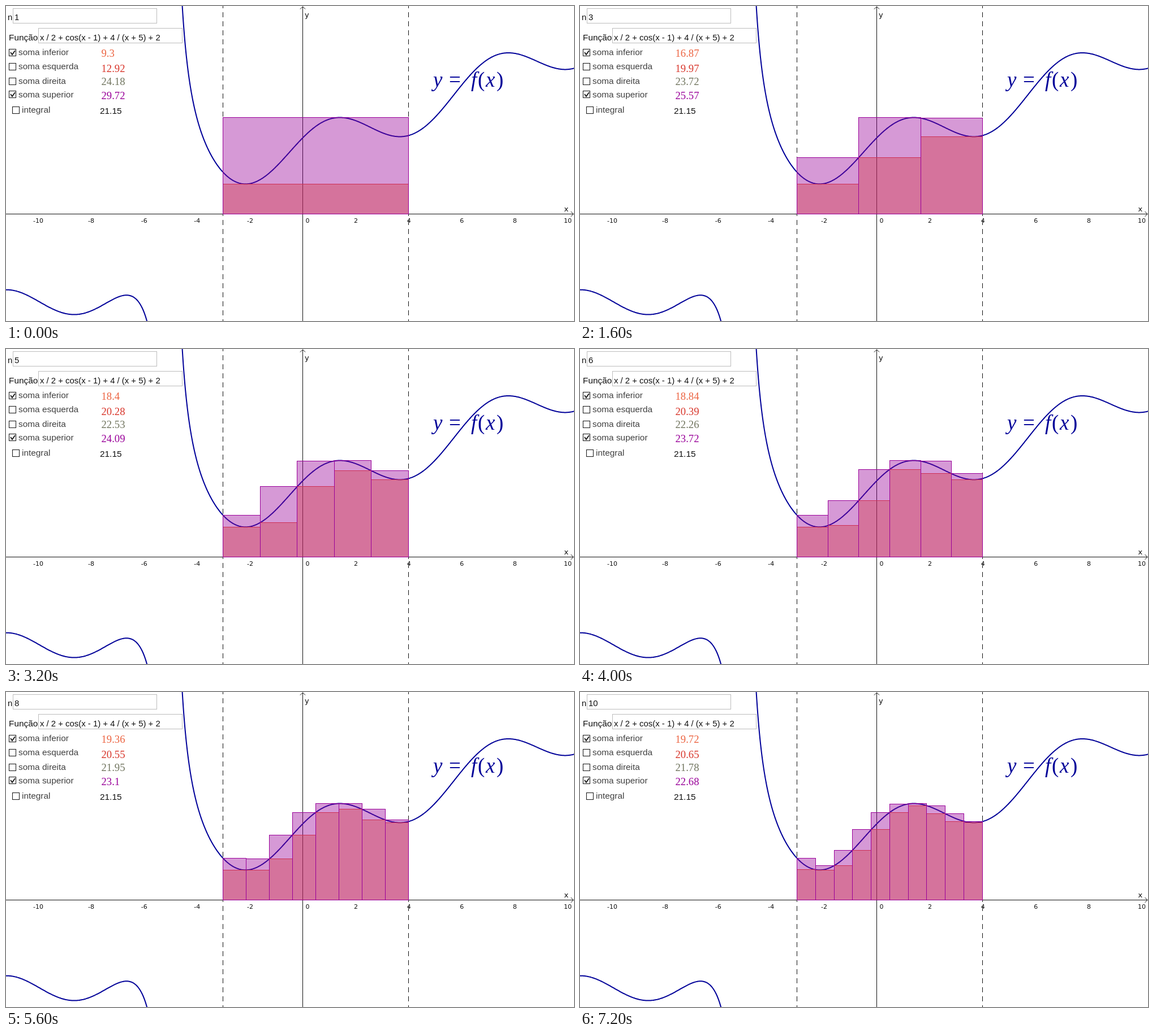
An HTML page for the animation above (8000 ms loop, 1004 by 558 pixels).

```html
<!DOCTYPE html>
<html lang="pt">
<head>
<meta charset="utf-8">
<title>Somas de Riemann</title>
<style>
html, body { margin: 0; width: 100%; height: 100%; overflow: hidden; background: #fff; }
svg { display: block; width: 1004px; height: 558px; }
text { font: 15.4px "Liberation Sans", Arial, sans-serif; fill: #111; white-space: pre; }
.label { fill: #404040; }
.field { font-size: 14.9px; }
.tick { font: 11px "DejaVu Sans", sans-serif; text-anchor: middle; }
.axis { font: 13px "DejaVu Sans", sans-serif; }
.sum { font: 18.7px "Liberation Serif", serif; }
.math { font: 37px "Liberation Serif", serif; fill: #000099; }
.it { font-style: italic; }
path, rect { fill: none; stroke: #111; }
.box { stroke: #bdbdbd; }
.check { stroke: #222; stroke-width: 1.1; }
.tickmark { stroke: #222; stroke-width: 2; }
.dash { stroke-dasharray: 9 7; }
.curve { stroke: #000099; stroke-width: 2; stroke-linejoin: round; }
.lower { fill: rgba(250,100,20,.41); stroke: #f0502a; }
.upper { fill: rgba(153,0,153,.4); stroke: #990099; }
</style>
</head>
<body>
<svg viewBox="0 0 1004 558"><g id="plot"></g><g id="bars"></g><g id="panel"></g></svg>
<script>
const NS = 'http://www.w3.org/2000/svg';
const A = -3, B = 4, STEP = 800, COUNT = 10;
const plot = document.getElementById('plot');
const bars = document.getElementById('bars');
const panel = document.getElementById('panel');

const f = x => x / 2 + Math.cos(x - 1) + 4 / (x + 5) + 2;
const px = x => 524 + x * 46.8;
const py = y => 369 - y * 40.39;

function add(parent, tag, attrs, content = '') {
  const el = document.createElementNS(NS, tag);
  for (const key in attrs) el.setAttribute(key, attrs[key]);
  el.textContent = content;
  parent.append(el);
  return el;
}
const path = (d, cls = '') => add(plot, 'path', { d, class: cls });
const text = (x, y, str, cls = '', parent = panel) => add(parent, 'text', { x, y, class: cls }, str);
const rect = (parent, x, y, width, height, cls) => add(parent, 'rect', { x, y, width, height, class: cls });

function branch(from, to) {
  const points = [];
  for (let x = from; x <= to; x += 0.02) points.push(px(x).toFixed(2) + ' ' + py(f(x)).toFixed(2));
  path('M' + points.join('L'), 'curve');
}

// Axes, limits and curve
path('M0 368.5H1003M998.5 364L1003 368.5L998.5 373');
path('M524.5 558V1M520 5.5L524.5 1L529 5.5');
for (let v = -10; v <= 10; v += 2) text(v ? px(v) + 1 : 533, 384, v, 'tick', plot);
text(986.5, 364, 'x', 'axis', plot);
text(528, 20, 'y', 'axis', plot);
path('M383.5 -5V558M711.5 -5V558', 'dash');
branch(-11.3, -5.1);
branch(-4.8, 10.4);

// Controls
rect(panel, 12.5, 4.5, 254, 26, 'box');
rect(panel, 57.5, 39.5, 254, 26, 'box');
text(3, 25, 'n', 'field');
const nText = text(15, 25, '', 'field');
text(5, 61, 'Função');
text(60, 61, 'x / 2 + cos(x - 1) + 4 / (x + 5) + 2', 'field');

function option(x, y, label, baseline, checked) {
  rect(panel, x + .5, y + .5, 12, 12, 'check');
  if (checked) add(panel, 'path', { d: `M${x + 3} ${y + 6}l3 4l5 -7`, class: 'tickmark' });
  text(x + 17, baseline, label, 'label');
}
option(5, 76, 'soma inferior', 87, true);
option(5, 101, 'soma esquerda', 112);
option(5, 127, 'soma direita', 138);
option(5, 150, 'soma superior', 162, true);
option(11, 178, 'integral', 189);
text(166, 191, '21.15');

const sums = [[90, '#ec6340'], [117, '#d8352a'], [140, '#71755f'], [165, '#990099']].map(([y, fill]) => {
  const el = text(168.5, y, '', 'sum');
  el.style.fill = fill;
  return el;
});

[[755, 'y', 'it'], [783, '='], [822, 'f', 'it'], [834, '('], [848, 'x', 'it'], [867, ')']]
  .forEach(([x, str, cls = '']) => text(x, 143, str, 'math ' + cls));

function extremes(a, b) {
  let low = Infinity, high = -Infinity;
  for (let i = 0; i <= 1000; i++) {
    const y = f(a + (b - a) * i / 1000);
    low = Math.min(low, y);
    high = Math.max(high, y);
  }
  return [low, high];
}

function bar(a, b, height, cls) {
  const x = Math.floor(px(a)) + .5, y = Math.floor(py(height)) + .5;
  rect(bars, x, y, Math.floor(px(b)) + .5 - x, 368.5 - y, cls);
}

function show(n) {
  const width = (B - A) / n, totals = [0, 0, 0, 0], slices = [];
  for (let i = 0; i < n; i++) {
    const a = A + i * width, b = a + width;
    const [low, high] = extremes(a, b);
    [low, f(a), f(b), high].forEach((y, k) => totals[k] += y * width);
    slices.push([a, b, low, high]);
  }
  bars.replaceChildren();
  slices.forEach(([a, b, low]) => bar(a, b, low, 'lower'));
  slices.forEach(([a, b, , high]) => bar(a, b, high, 'upper'));
  nText.textContent = n;
  sums.forEach((el, k) => el.textContent = +totals[k].toFixed(2));
}

let shown = 0;
const start = performance.now();
function frame(now) {
  const n = Math.floor(Math.max(0, now - start) / STEP) % COUNT + 1;
  if (n !== shown) show(shown = n);
  requestAnimationFrame(frame);
}
frame(start);
</script>
</body>
</html>
```
